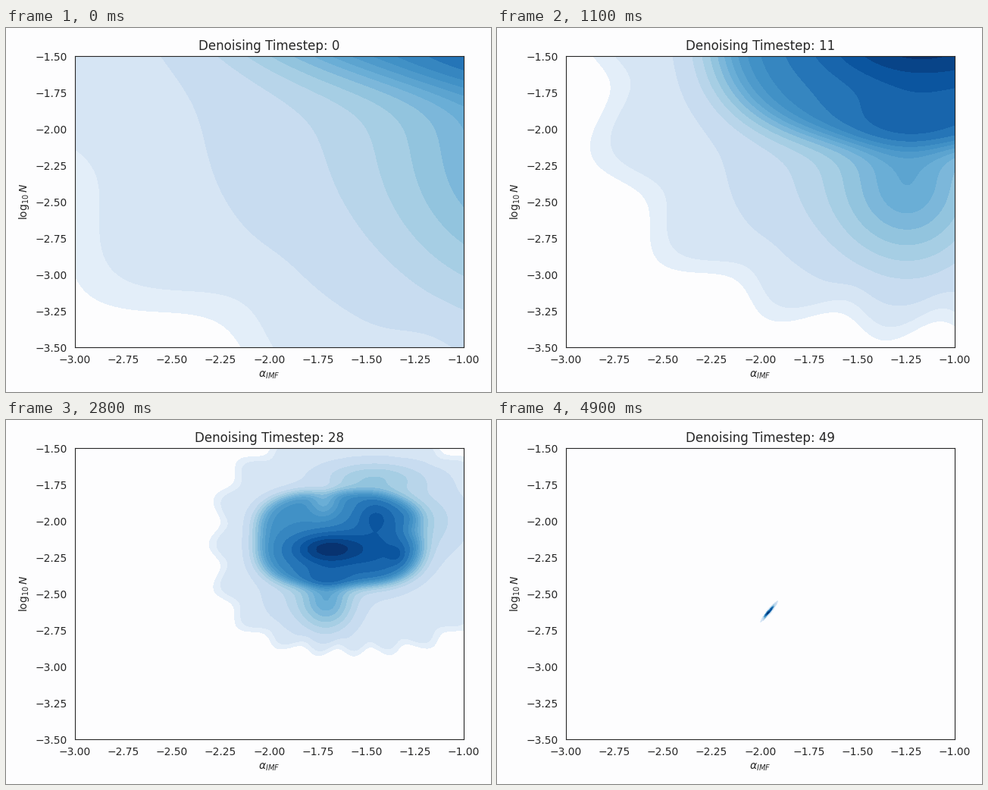
Recreate the animation shown at these times as a matplotlib script. Size 640 by 480 pixels, loop 5 s.

```python
import numpy as np
import matplotlib
import matplotlib.pyplot as plt
from matplotlib.animation import FuncAnimation
from matplotlib.transforms import Affine2D

STEPS, INTERVAL = 50, 100
BACK, INK = "#fdfdfe", "#262626"
XLIM, YLIM = (-3, -1), (-3.5, -1.5)
LEFT, TOP, WIDTH, HEIGHT = 91.5, 35.5, 512.5, 385.5

# The cloud is drawn once in pixels, as it looks at step REST,
# and is then shrunk about its middle while it moves to the goal.
REST, END, DECAY = 28, 49.5, .044
MIDDLE, GOAL = np.array([445, 165]), np.array([357.7, 253.5])
NEEDLE_ANGLE, NEEDLE_LENGTH = np.radians(52.8), .10


def plateau(x, y, centre, size, power, soft, ripple=0.0):
    """Flat-topped superellipse of height 1 with a soft, optionally wavy rim."""
    dx, dy = (x - centre[0]) / size[0], (y - centre[1]) / size[1]
    rho = (abs(dx) ** power + abs(dy) ** power) ** (1 / power)
    rho = rho - ripple * np.cos(20 * np.arctan2(dy * size[1], dx * size[0]))
    return 1 / (1 + np.exp(np.clip((rho - 1) / soft, -50, 50)))


def bump(x, y, cx, cy, sx, sy, height):
    return height * np.exp(-((x - cx) / sx) ** 2 / 2 - ((y - cy) / sy) ** 2 / 2)


BUMPS = [(423, 168, 32, 14, .30),    # main peak
         (490, 172, 38, 34, .17),    # right shoulder
         (487, 125, 16, 14, .12),    # upper ridge
         (515, 176, 8, 8, .07),      # small second peak
         (425, 238, 24, 27, .30),    # lower lobe
         (385, 230, 35, 30, .08),
         (485, 76, 48, 16, .20),     # upper lobe
         (560, 130, 35, 30, .11),    # right lobe
         (420, 106, 14, 14, -.14),   # notches
         (537, 145, 14, 12, -.10)]


def density(x, y):
    skirt = .17 * plateau(x, y, (460, 162), (181, 140), 2.7, .03, ripple=.04)
    body = .47 * plateau(x, y, (440, 155), (108, 62), 3, .07)
    return skirt + body + sum(bump(x, y, *b) for b in BUMPS)


def shade(band):
    """Colour position of a band; half steps give the limits between bands."""
    return np.interp(band, [-1, 0, 2, 6, 11, 16], [.03, .10, .24, .46, .67, .985])


def spread(step):
    fall = np.exp(-DECAY * np.array([step, REST, END]))
    return (fall[0] - fall[2]) / (fall[1] - fall[2])


plt.rcParams.update({"font.family": "DejaVu Sans", "text.color": INK,
                     "axes.labelcolor": INK, "xtick.color": INK, "ytick.color": INK,
                     "axes.edgecolor": INK})
fig, ax = plt.subplots(figsize=(6.4, 4.8), dpi=100, facecolor=BACK)
ax.set(facecolor=BACK, xlim=XLIM, ylim=YLIM,
       xticks=np.arange(-3, -.9, .25), yticks=np.arange(-3.5, -1.4, .25),
       xlabel=r"$\alpha_{IMF}$", ylabel=r"$\log_{10} N$")
ax.xaxis.set_major_formatter("{x:.2f}")
ax.yaxis.set_major_formatter("{x:.2f}")
ax.tick_params(bottom=False, left=False)
title = ax.set_title("Denoising Timestep: 0")
fig.tight_layout()

bands = np.arange(17)
x, y = np.meshgrid(np.arange(220, 700.), np.arange(-30, 340.))
cloud = ax.contourf(x, y, density(x, y), levels=[*shade(bands - .5), 2],
                    colors=matplotlib.colormaps["Blues"](shade(bands)))
ax.set(xlim=XLIM, ylim=YLIM)

pixels_to_data = (Affine2D().translate(-LEFT, -TOP)
                  .scale(2 / WIDTH, -2 / HEIGHT).translate(XLIM[0], YLIM[1]))


def draw(step):
    k = spread(step)
    place = (Affine2D().translate(*-MIDDLE)
             .rotate(NEEDLE_ANGLE).scale(np.hypot(k, NEEDLE_LENGTH), k)
             .rotate(-NEEDLE_ANGLE).translate(*(GOAL + k * (MIDDLE - GOAL))))
    cloud.set_transform(place + pixels_to_data + ax.transData)
    title.set_text(f"Denoising Timestep: {step}")
    return [cloud, title]


anim = FuncAnimation(fig, draw, frames=STEPS, interval=INTERVAL,
                     repeat=True, repeat_delay=0, blit=False)
plt.show()
```
